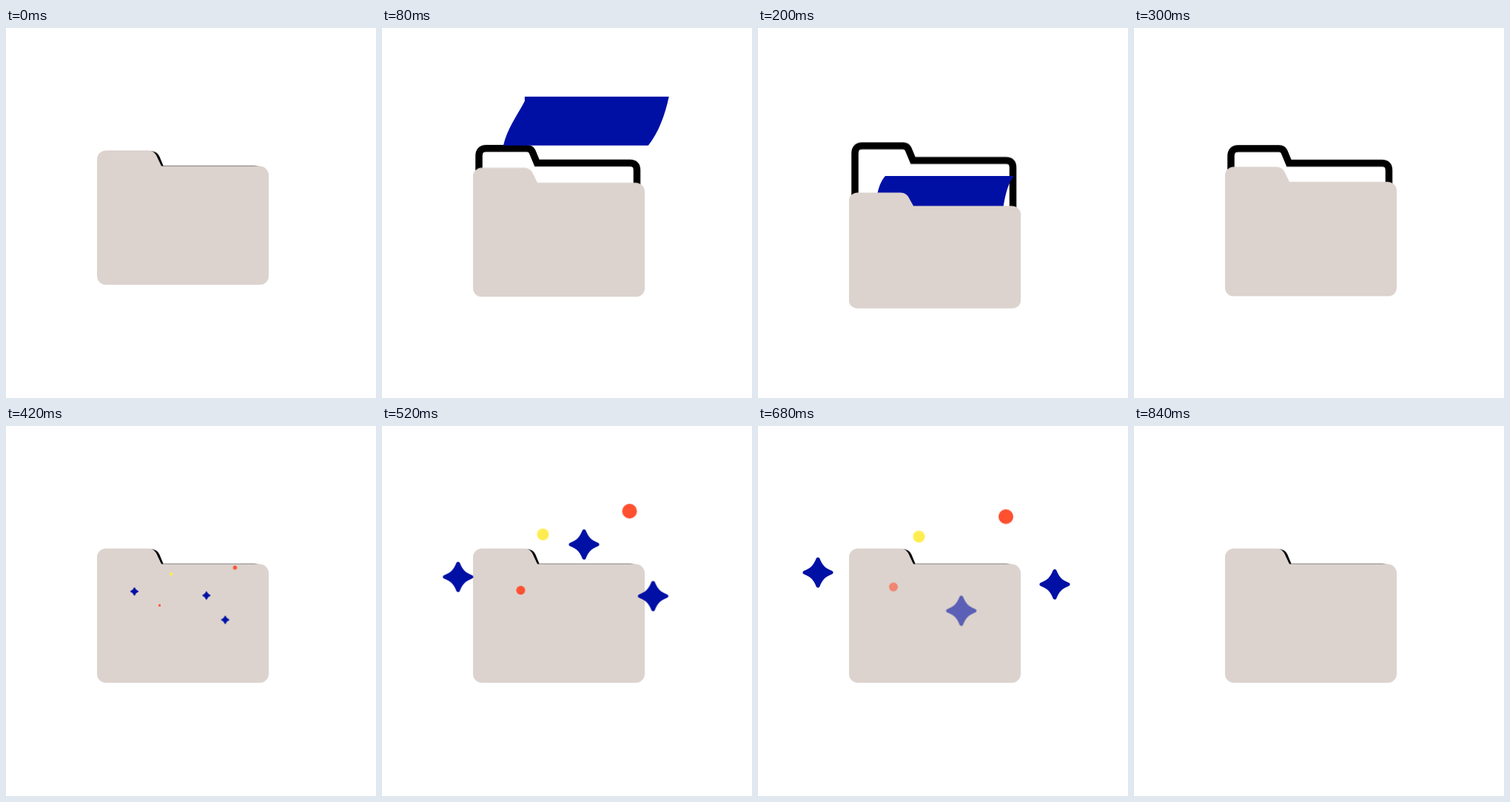
Write an HTML page without scripts that moves like this. It is 500 by 500 pixels and loops after 0.88 s.

```html
<!DOCTYPE html>
<html lang="en">
<head>
<meta charset="utf-8">
<title>Folder</title>
<style>
html, body { margin: 0; width: 100%; height: 100%; overflow: hidden; background: #fff; }
svg { display: block; width: 100vw; height: 100vh; }
svg * { animation: 880ms linear infinite; }

.back { fill: #fff; stroke: #000; stroke-width: 9.5; animation-name: back; }
.front { fill: #dcd3ce; transform-origin: 0 347px; animation-name: front; }
.sheet { fill: #0010a5; animation-name: sheet; }
.star { fill: #0010a5; stroke: #0010a5; stroke-width: 5; stroke-linejoin: round; }

/* --from: burst origin, --out: end of the burst, --rest: end of the drift */
.spark { animation-name: drift, fade; }
.brief { animation-name: drift, fade-early; }
.drop { animation-name: drop, fade-early; }

@keyframes back {
  0%, 43.18%, 100% { transform: translateY(8.5px); animation-timing-function: ease-in; }
  9.09% { transform: none; animation-timing-function: ease-out; }
  18.18%, 25% { transform: translateY(-3.5px); animation-timing-function: ease-in; }
  34.09% { transform: none; animation-timing-function: ease-out; }
}
@keyframes front {
  0%, 43.18%, 100% { transform: translateY(0) scaleY(1); animation-timing-function: ease-in; }
  9.09%, 34.09% { transform: translateY(16px) scaleY(.964); animation-timing-function: ease-out; }
  18.18%, 25% { transform: translateY(32px) scaleY(.863); animation-timing-function: ease-in; }
}
@keyframes sheet {
  0%, 2.2% { visibility: hidden; d: path("M243 63L243 67C231 83 213 97 205 113L400 113C417 100 431 80 437 63Z"); }
  2.21% { visibility: visible; d: path("M243 63L243 67C231 83 213 97 205 113L400 113C417 100 431 80 437 63Z"); }
  9.09% {
    d: path("M193 92L193 98C182 119 169 136 164 158L360 158C374 141 383 116 388 92Z");
    animation-timing-function: cubic-bezier(.33, .25, .67, .6);
  }
  22.73% { d: path("M172 199L172 199C163 210 159 222 157 270L329 270C330 240 336 210 346 199Z"); }
  34.09% { visibility: visible; d: path("M165 290L165 290C161 300 160 320 160 355L328 355C328 320 330 300 335 290Z"); }
  34.1%, 100% { visibility: hidden; d: path("M165 290L165 290C161 300 160 320 160 355L328 355C328 320 330 300 335 290Z"); }
}
@keyframes drift {
  0%, 45.45% { transform: translate(var(--from)) scale(0); animation-timing-function: ease-out; }
  59.09% { transform: translate(var(--out)) scale(1); animation-timing-function: ease-out; }
  77.27%, 100% { transform: translate(var(--rest)) scale(1); }
}
@keyframes drop {
  0%, 45.45% { transform: translate(var(--from)) scale(0); animation-timing-function: ease-out; }
  59.09% { transform: translate(var(--out)) scale(1); animation-timing-function: cubic-bezier(.33, .05, .67, .4); }
  84.09%, 100% { transform: translate(var(--rest)) scale(1); }
}
@keyframes fade {
  0%, 45.45% { opacity: 0; }
  45.46%, 79.55% { opacity: 1; }
  95%, 100% { opacity: 0; }
}
@keyframes fade-early {
  0%, 45.45% { opacity: 0; }
  45.46%, 72.73% { opacity: 1; }
  84.09%, 100% { opacity: 0; }
}
</style>
</head>
<body>
<svg viewBox="0 0 500 500">
  <defs>
    <path id="star" d="M0-18C4-8 8-4 18 0C8 4 4 8 0 18C-4 8-8 4-18 0C-8-4-4-8 0-18Z"/>
  </defs>

  <path class="back" d="M131 173Q131 162.7 141 162.7H196Q201 162.7 203 167L209.5 182.5H335Q344.5 182.5 344.5 192V322H131Z"/>
  <path class="sheet" d="M243 63L243 67C231 83 213 97 205 113L400 113C417 100 431 80 437 63Z"/>
  <path class="front" d="M123 177.500A12 12 0 0 1 135 165.500H192C200 165.500 203 171 205 176L210 186.500H342.500A12.500 12.500 0 0 1 355 199V335A12 12 0 0 1 343 347H135A12 12 0 0 1 123 335Z"/>

  <g class="spark" style="--from: 200px, 231px; --out: 103px, 204px; --rest: 81px, 198px"><use href="#star" class="star"/></g>
  <g class="spark" style="--from: 270px, 274px; --out: 366px, 230px; --rest: 401px, 214px"><use href="#star" class="star"/></g>
  <g class="drop" style="--from: 270px, 255px; --out: 273px, 160px; --rest: 276px, 317px"><use href="#star" class="star"/></g>
  <circle class="spark" r="10" fill="#ff5030" style="--from: 300px, 220px; --out: 334.500px, 115px; --rest: 335px, 122.500px"/>
  <circle class="spark" r="8" fill="#ffec50" style="--from: 225px, 220px; --out: 217.500px, 146.500px; --rest: 217.500px, 149.500px"/>
  <circle class="brief" r="6" fill="#ff5030" style="--from: 215px, 250px; --out: 187.500px, 222px; --rest: 183px, 217.500px"/>
</svg>
</body>
</html>
```
